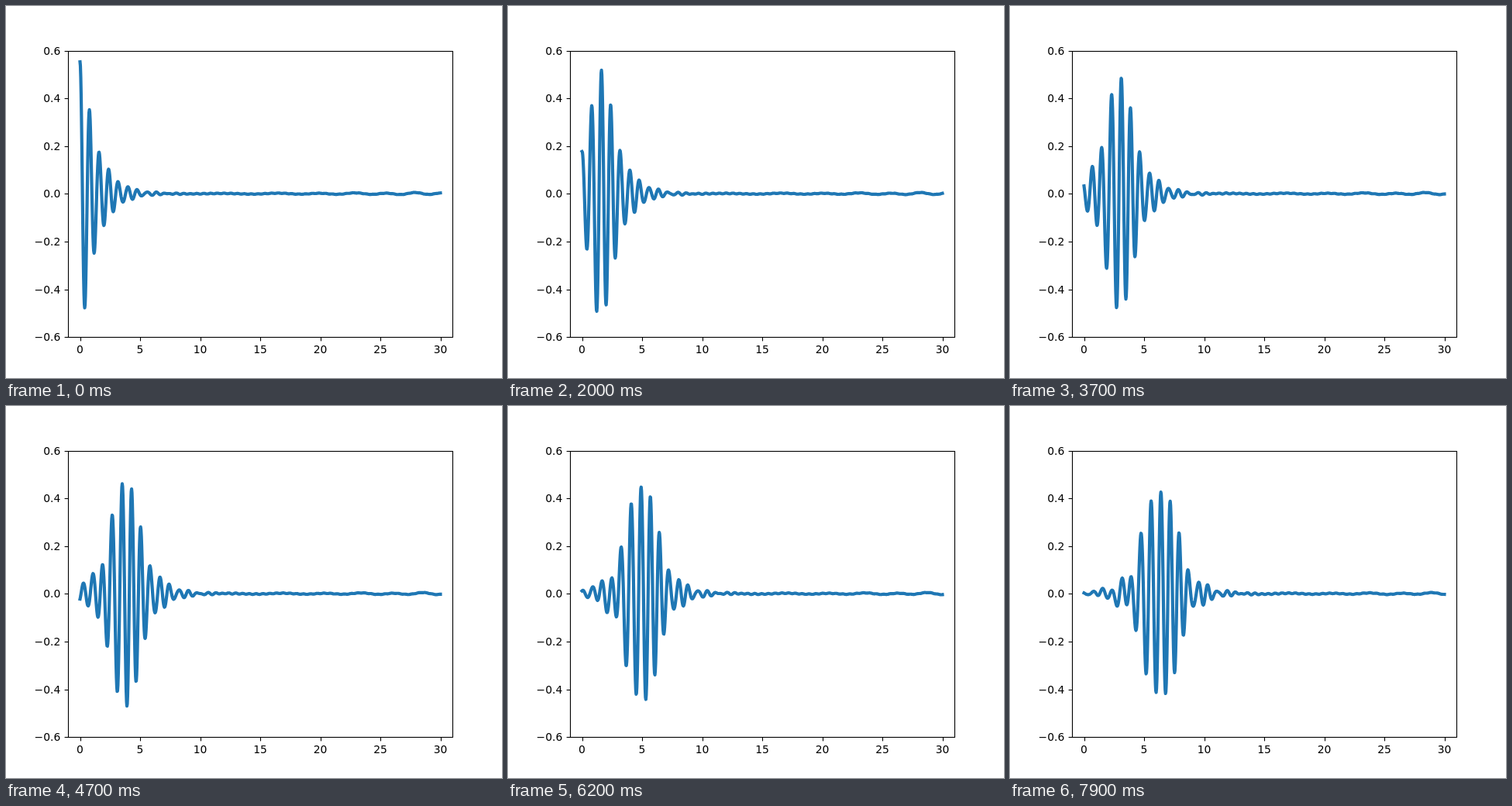
An HTML page with a canvas that plays this animation: 640 by 480 pixels, repeating every 8 s.

```html
<!DOCTYPE html>
<html lang="en">
<head>
<meta charset="utf-8">
<title>Dispersive wave packet</title>
<style>
html, body { margin: 0; width: 100%; height: 100%; overflow: hidden; background: #fff; }
canvas { display: block; }
</style>
</head>
<body>
<canvas id="plot" width="640" height="480"></canvas>
<script>
const ctx = document.getElementById('plot').getContext('2d');
const LOOP = 8000, STEP = 100;
const LEFT = 80, RIGHT = 576, TOP = 57.6, BOTTOM = 427.2;
const px = x => LEFT + (x + 1) / 32 * (RIGHT - LEFT);
const py = y => BOTTOM - (y + 0.6) / 1.2 * (BOTTOM - TOP);
const snap = v => Math.floor(v + 0.5) + 0.5;

// Resonance spectrum, evenly spaced in frequency; wavenumber grows as its square root.
const MODES = 100, F0 = 0.5, WIDTH = 0.1, K0 = 2.5 * Math.PI, PEAK = 0.553;
const modes = Array.from({ length: MODES }, (_, i) => {
  const f = i / (MODES - 1);
  return {
    omega: 2 * Math.PI * f,
    k: K0 * Math.sqrt(f / F0),
    amp: 1 / (1 + ((f - F0) / WIDTH) ** 2)
  };
});
const total = modes.reduce((sum, m) => sum + m.amp, 0);
modes.forEach(m => { m.amp *= PEAK / total; });

function wave(x, t) {
  let sum = 0;
  for (const m of modes) sum += m.amp * Math.cos(m.k * x - m.omega * t);
  return sum;
}

function line(x1, y1, x2, y2) {
  ctx.beginPath();
  ctx.moveTo(x1, y1);
  ctx.lineTo(x2, y2);
  ctx.stroke();
}

function drawCurve(t) {
  const points = 1000;
  ctx.strokeStyle = '#1f77b4';
  ctx.lineWidth = 4.17;
  ctx.lineJoin = 'round';
  ctx.lineCap = 'square';
  ctx.beginPath();
  for (let i = 0; i < points; i++) {
    const x = 30 * i / (points - 1);
    ctx.lineTo(px(x), py(wave(x, t)));
  }
  ctx.stroke();
}

function drawAxes() {
  ctx.strokeStyle = ctx.fillStyle = '#000';
  ctx.lineWidth = 1.11;
  ctx.lineCap = 'butt';
  ctx.lineJoin = 'miter';
  ctx.font = '13.89px "DejaVu Sans", sans-serif';
  ctx.textBaseline = 'alphabetic';

  ctx.textAlign = 'center';
  for (let x = 0; x <= 30; x += 5) {
    const sx = snap(px(x));
    line(sx, 427.5, sx, 432.4);
    ctx.fillText(String(x), px(x), 448);
  }
  ctx.textAlign = 'right';
  for (let i = -3; i <= 3; i++) {
    const y = py(i / 5);
    line(75.6, snap(y), 80.5, snap(y));
    ctx.fillText((i / 5).toFixed(1).replace('-', '\u2212'), 70.3, Math.round(y) + 5);
  }
  const l = snap(LEFT), t = snap(TOP);
  ctx.strokeRect(l, t, snap(RIGHT) - l, snap(BOTTOM) - t);
}

function draw(t) {
  ctx.fillStyle = '#fff';
  ctx.fillRect(0, 0, 640, 480);
  drawCurve(t);
  drawAxes();
}

let start = null, shown = 0;
function tick(now) {
  if (start === null) start = now;
  const step = Math.floor(((now - start) % LOOP + 0.01) / STEP) % (LOOP / STEP);
  if (step !== shown) {
    shown = step;
    draw(step * STEP / 1000);
  }
  requestAnimationFrame(tick);
}
draw(0);
requestAnimationFrame(tick);
</script>
</body>
</html>
```
